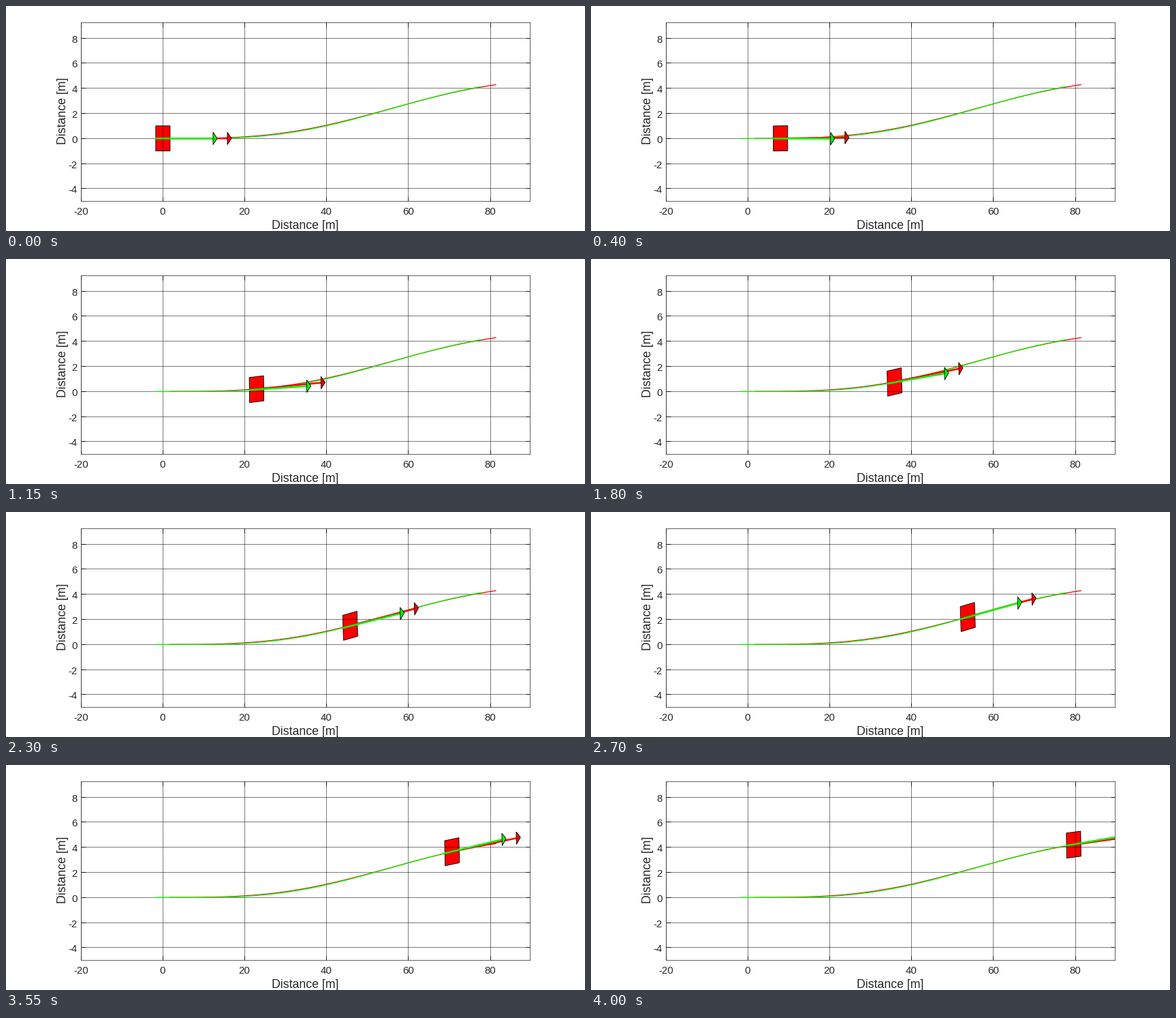
A matplotlib script that plays this animation: 850 px wide and 330 px high, repeating every 4.05 s.

```python
import numpy as np
import matplotlib.pyplot as plt
from matplotlib.animation import FuncAnimation
from matplotlib.patches import Polygon
from matplotlib.transforms import ScaledTranslation

W, H, DPI = 850, 330, 100
FRAMES, INTERVAL = 81, 50
PX = 72 / DPI                      # one pixel in points
LEFT, RIGHT, TOP, BOTTOM = 109.8, 769.0, 24.0, 285.8
SX, SY = 6.008, 18.4               # pixels per metre
DARK = "#262626"
RED, GREEN = (1, 0, 0), (0, 1, 0)

HALF_LEN, HALF_WID, ARROW = 1.75, 1.0, 15.0
WAVE = 2 * np.pi / 104             # lane change wave number
YAW, DRIFT, LAG = 0.0485, 0.0455, 4.0


def heading(s):
    return YAW * (1 - np.cos(WAVE * s))


def course(s, axle):
    """Direction of travel at an axle offset from the centre."""
    u = np.maximum(s - LAG, 0)
    return DRIFT * (1 - np.cos(WAVE * u)) + axle * YAW * WAVE * np.sin(WAVE * s)


def place(s, axle=0.0):
    """Position of a point on the centre line after s metres."""
    u = np.maximum(s - LAG, 0)
    y = DRIFT * (u - np.sin(WAVE * u) / WAVE)
    psi = heading(s)
    return np.array([0.995 * s + axle * np.cos(psi), y + axle * np.sin(psi)])


def turn(points, angle, origin):
    c, s = np.cos(angle), np.sin(angle)
    return np.asarray(points) @ np.array([[c, s], [-s, c]]) + origin


fig = plt.figure(figsize=(W / DPI, H / DPI), dpi=DPI, facecolor="white")
ax = fig.add_axes([LEFT / W, 1 - BOTTOM / H, (RIGHT - LEFT) / W, (BOTTOM - TOP) / H])
ax.set_xlim(-20, -20 + (RIGHT - LEFT) / SX)
ax.set_ylim(-5, -5 + (BOTTOM - TOP) / SY)
ax.set_xticks(range(-20, 81, 20))
ax.set_yticks(range(-4, 9, 2))
ax.tick_params(direction="in", length=6.5 * PX, width=0.9 * PX, color=DARK,
               top=True, right=True, labelbottom=False, labelleft=False)
for spine in ax.spines.values():
    spine.set(linewidth=0.9 * PX, color=DARK, alpha=0.8)

# Grid lines snap to pixel centres; smooth shapes need a matching nudge.
nudge = ax.transData + ScaledTranslation(0.4 / DPI, -0.4 / DPI, fig.dpi_scale_trans)


def label(x, y, text, size, ha="center", **kw):
    fig.text(x / W, 1 - y / H, text, fontsize=size * PX, ha=ha, va="baseline",
             color=DARK, family="Liberation Sans", **kw)


for v in ax.get_xticks():
    ax.axvline(v, color="black", alpha=0.57, lw=0.9 * PX, zorder=2.5)
    label(LEFT + (v + 20) * SX, 306, f"{v:.0f}", 15)
for v in ax.get_yticks():
    ax.axhline(v, color="black", alpha=0.57, lw=0.9 * PX, zorder=2.5)
    label(104.8, BOTTOM - (v + 5) * SY + 7, f"{v:.0f}", 15, ha="right")
label(439.4, 327, "Distance [m]", 17.8)
label(88, 154, "Distance [m]", 17.8, rotation=90, rotation_mode="anchor")

BODY = [(-HALF_LEN, -HALF_WID), (HALF_LEN, -HALF_WID),
        (HALF_LEN, HALF_WID), (-HALF_LEN, HALF_WID)]
HEAD = [(ARROW - 1, -0.5), (ARROW, 0), (ARROW - 1, 0.5)]


def shape(points, fill, z):
    return ax.add_patch(Polygon(points, fc=fill, ec="black", lw=0.9 * PX,
                                zorder=z, snap=False, transform=nudge))


body = shape(BODY, RED, 2)

route = np.linspace(0, FRAMES - 1, 300)
for axle, color, z in ((HALF_LEN, RED, 3), (-HALF_LEN, GREEN, 3.1)):
    ax.plot(*place(route, axle), color=color, lw=1.3 * PX, zorder=z,
            snap=False, transform=nudge)


def make_arrow(axle, color, z):
    stem, = ax.plot([], [], color=color, lw=2.5 * PX, zorder=z, snap=False,
                    solid_capstyle="butt", transform=nudge)
    return axle, stem, shape(HEAD, color, z + 0.1)


arrows = [make_arrow(HALF_LEN, RED, 4), make_arrow(-HALF_LEN, GREEN, 5)]


def update(i):
    s = float(i)
    body.set_xy(turn(BODY, heading(s), place(s)))
    artists = [body]
    for axle, stem, head in arrows:
        start, angle = place(s, axle), course(s, axle)
        stem.set_data(*turn([(0, 0), (ARROW - 0.5, 0)], angle, start).T)
        head.set_xy(turn(HEAD, angle, start))
        artists += [stem, head]
    return artists


anim = FuncAnimation(fig, update, frames=FRAMES, interval=INTERVAL,
                     repeat=True, repeat_delay=0)
plt.show()
```
